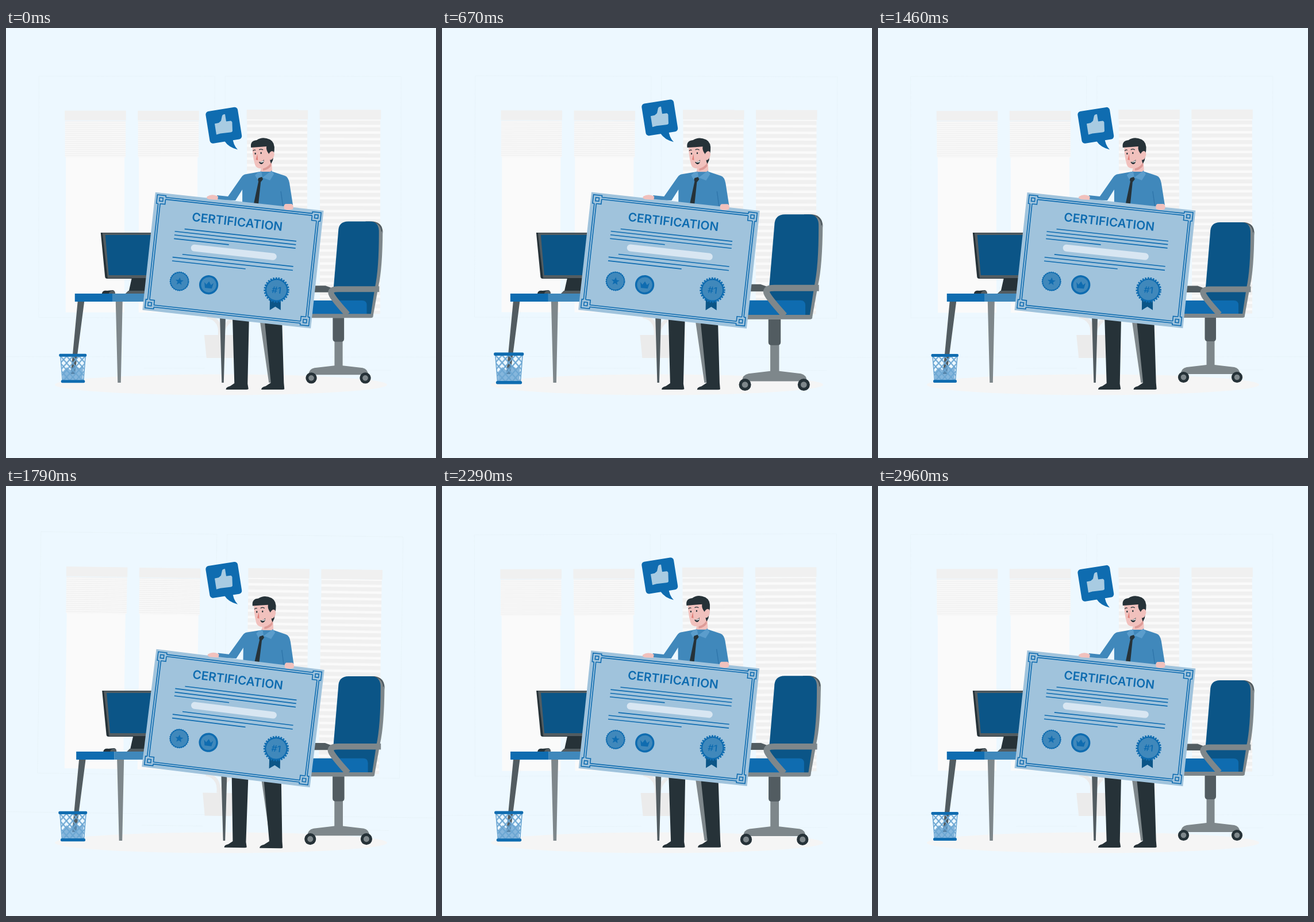
An HTML page for the animation above (3000 ms loop, 748x748 px).

```html
<!DOCTYPE html>
<html lang="en">
<head>
<meta charset="utf-8">
<title>Certification</title>
<style>
  html, body { margin: 0; width: 100%; height: 100%; overflow: hidden; background: #edf8ff; }
  svg { display: block; width: 100vw; height: 100vh; }
  text { font-family: Inter, "Open Sans", sans-serif; fill: #0f6cb0; text-anchor: middle; }
  .faint { fill: none; stroke: #e5f0f6; stroke-width: .6; }
  .ink { fill: none; stroke: #0f6cb0; stroke-width: 1.6; }
  .blue { fill: #0f6cb0; }
  .navy { fill: #0b5587; }
  .mid { fill: #4088bb; }
  .dark { fill: #263238; }
  .steel { fill: #525c61; }
  .grey { fill: #7e878b; }
  .skin { fill: #f1c1bd; }
</style>
</head>
<body>
<svg viewBox="0 0 748 748">
  <defs>
    <pattern id="thin" width="10" height="3.5" y="162" patternUnits="userSpaceOnUse">
      <rect width="10" height="3.5" fill="#f8f8f8"/><rect width="10" height="1" fill="#eee"/>
    </pattern>
    <pattern id="wide" width="10" height="11.4" y="161" patternUnits="userSpaceOnUse">
      <rect width="10" height="11.4" fill="#fafafa"/><rect width="10" height="7" fill="#f0f0f0"/>
    </pattern>
    <pattern id="mesh" width="10.6" height="12" x="95" y="571" patternUnits="userSpaceOnUse">
      <path d="M0 0L10.6 12M10.6 0L0 12" stroke="#6ba6d2" stroke-width="2"/>
    </pattern>
    <g id="closed">
      <rect x="104" y="224" width="102" height="271" fill="#fafafa"/>
      <rect x="102.500" y="162" width="105.500" height="63" fill="url(#thin)"/>
      <rect x="102" y="144" width="106.500" height="17" fill="#f0f0f0"/>
    </g>
    <g id="open">
      <rect x="419" y="159" width="105" height="338" fill="url(#wide)"/>
      <rect x="418.500" y="142" width="106.500" height="17" fill="#f0f0f0"/>
    </g>
    <g id="corner" class="ink">
      <path d="M19 7V4H4V19H7M10.500 19H19V10.500"/>
      <rect x="8.500" y="8.500" width="6" height="6"/>
    </g>
    <g id="wheel"><circle r="9.600" class="dark"/><circle r="4.800" class="grey"/></g>
  </defs>

  <g id="room">
    <path class="faint" d="M57 84H363V504H57ZM381 84H687V504H381ZM0 572H748M240 592H346M560 595H670"/>
    <use href="#closed"/><use href="#closed" x="127"/>
    <use href="#open"/><use href="#open" x="127"/>
    <path d="M350 502Q375 506 372 534M395 505Q377 518 377 534" fill="none" stroke="#ebebeb" stroke-width="6"/>
    <path d="M345 534H401L396 574H349Z" fill="#ebebeb"/>
  </g>

  <ellipse cx="374" cy="620.500" rx="289" ry="18" fill="#f5f5f5"/>

  <g id="desk">
    <path class="steel" d="M125 475H136.500L120 602H113ZM371.500 475H383L379 617H375.500Z"/>
    <path class="grey" d="M191 475H203L200 617H194.500ZM437 475H450L463 617H457.500Z"/>
    <rect class="blue" x="120" y="462" width="66" height="14"/>
    <rect class="mid" x="186" y="462" width="255" height="14"/>
    <path class="dark" d="M165 356H262V436H176Q173 436 172.500 433ZM219 435H250L247 462H213Z"/>
    <path class="steel" d="M168 356.500H262V435H177Z"/>
    <path class="navy" d="M173 360H262V430H179Z"/>
    <path class="dark" d="M167 462Q168 456 176 457L186 456Q190 457 190 462Z"/>
    <path class="steel" d="M179 462Q180 457 187 456.500Q190 458 190 462ZM208 462L213 457H250V462Z"/>
  </g>

  <g id="bin">
    <path d="M99 598L106 590L112 595L119 586L128 592L134 588L133 613H99Z" fill="#5a9bce" opacity=".7"/>
    <path d="M95 571H138L134.500 614H98.500Z" fill="url(#mesh)" stroke="#6ba6d2" stroke-width="1.500"/>
    <rect class="blue" x="92.500" y="567" width="47.500" height="5" rx="2"/>
    <rect class="blue" x="96" y="612" width="41" height="5" rx="2"/>
  </g>

  <g id="chair">
    <path class="steel" d="M520 448.500H556L568 453L564 460H520Z"/>
    <path class="steel" d="M625 338H638Q654 340 654.500 356L650 400H638Z"/>
    <path class="grey" d="M630 340H638Q651 342 652 356L654.500 354Q654 420 647 450L638 500H628Z"/>
    <path class="navy" d="M578 356Q578 338 595 338H632Q649 338 648 358Q648 420 641 452L634 498H566Z"/>
    <path class="blue" d="M518 474H619Q627 474 627 482V498H518Z"/>
    <path d="M648.500 454.500H578Q561 454.500 567 465Q573 475 594 498" fill="none" stroke="#7e878b" stroke-width="10"/>
    <path class="grey" d="M515 497H638V501Q638 504 634 504H515Z"/>
    <path class="grey" d="M571.500 540H585.500V586L620 590Q629 592 629.500 602H527Q527 592 537 590L571.500 586Z"/>
    <path class="steel" d="M568.500 504H588V540Q588 545 583 545H573.500Q568.500 545 568.500 540Z"/>
    <use href="#wheel" x="531.500" y="607.500"/><use href="#wheel" x="624.500" y="607.500"/>
  </g>

  <g id="man">
    <path class="dark" d="M394 500H423L420.500 619L422 628Q421 629 418 629H383Q382 625 390 623L397.500 618ZM449 500H480L483.500 617L484.500 628Q484 629 481 629H444.500Q444 625 452 623L461 617Z"/>
    <path class="skin" d="M446 236L462 232L463 252L447 256L442 250Z"/>
    <path d="M447 244Q456 242 461 234V240Q456 247 447 248Z" fill="#dd9b97"/>
    <path class="mid" d="M419 254L441 250L464 250L485 257Q491 259 493 270L499 308L484 314L411 306V281L399 300L367 299V291L386 293L409 260Q413 254 419 254Z"/>
    <path d="M478 284L482 312" stroke="#2f76ab" stroke-width="1.500"/>
    <path d="M437 252L444 249L446 260L438 265L433 256ZM446 260L462 248L466 254L459 265Z" fill="#5b9dcc"/>
    <path class="dark" d="M439 261L445 259L447 263L443 268L439 306L431 305L439 267L438 264Z"/>
    <path class="skin" d="M428 205L457 202L461 213V230Q459 241 448 244Q436 246 433 238Q430 228 429 217Z"/>
    <path class="dark" d="M426 208Q424 196 436 195Q446 188 459 194Q468 199 466.500 213L464 230L461 236Q458 230 459 222L455 216Q452 211 453 206Q440 207 426 208Z"/>
    <path class="skin" d="M457 219Q461 212 465 215Q468 219 465 225Q462 231 458 229Z"/>
    <ellipse cx="433.500" cy="218.500" rx="1.200" ry="1.700" class="dark"/>
    <ellipse cx="443.500" cy="217.500" rx="1.200" ry="1.700" class="dark"/>
    <path d="M429.500 214Q431 211 434 212.500M440 212Q443 209.500 447 212" fill="none" stroke="#263238" stroke-width="1.200"/>
    <path d="M437 219L434.500 229L438 230Z" fill="#e07f79"/>
    <path class="dark" d="M439.500 233Q445 233 448.500 229Q449 236 444 237Q441 236.500 439.500 233Z"/>
    <path d="M441 233Q445 233 448 230.500V232.500Q445 235 441 233Z" fill="#fff"/>

    <g transform="translate(259.700 285.800) rotate(6.200)">
      <rect width="294.500" height="206" fill="#a0c3dc"/>
      <path class="ink" d="M19 7H275.500M19 10.500H275.500M19 199H275.500M19 195.500H275.500M7 19V187M10.500 19V187M287.500 19V187M284 19V187"/>
      <use href="#corner"/>
      <use href="#corner" transform="translate(294.500) scale(-1 1)"/>
      <use href="#corner" transform="translate(0 206) scale(1 -1)"/>
      <use href="#corner" transform="translate(294.500 206) scale(-1)"/>
      <text x="147.300" y="43" font-size="20.800" font-weight="600">CERTIFICATION</text>
      <path class="ink" d="M57.500 58H253M41 64H253M41 70.300H253M41 76.700H137M58.500 102.300H252.500M42 109H252.500M42 115.500H170.500"/>
      <path d="M78 89H216" stroke="#d8e6f2" stroke-width="12" stroke-linecap="round"/>

      <g transform="translate(58.500 149.500)">
        <circle r="15.500" class="mid" stroke="#0f6cb0" stroke-width="1.500"/>
        <circle r="16" fill="none" stroke="#0f6cb0" stroke-width="2" stroke-dasharray="2 1.590"/>
        <path class="blue" d="M0 -7L2 -2.300L7 -2.100L3 1.100L4.400 6L0 3.200L-4.400 6L-3 1.100L-7 -2.100L-2 -2.300Z"/>
      </g>
      <g transform="translate(109.800 150)">
        <circle r="16.700" class="blue"/>
        <circle r="13.200" class="mid"/>
        <path class="blue" d="M-8 -4L-4 0L0 -6L4 0L8 -4L6 6H-6Z"/>
      </g>
      <g transform="translate(228.100 146.200)">
        <path class="navy" d="M-10 15L-8 36L1 29L11 34L9 15Z"/>
        <circle r="20" class="blue"/>
        <circle r="20.500" fill="none" stroke="#0f6cb0" stroke-width="3.400" stroke-dasharray="2.600 2"/>
        <circle r="17.600" class="mid"/>
        <text y="5.500" font-size="15.500" font-weight="600">#1</text>
      </g>
    </g>
    <path class="skin" d="M368 299L353 298Q347 296 350 293Q356 289 364 291L369 293ZM484 315Q482 308 486 306L497 306Q501 309 499 315Q492 318 484 315Z"/>
  </g>

  <g id="bubble">
    <path class="blue" d="M378 194L394 190Q395 204 403 212Q387 208 380 197Z"/>
    <g transform="translate(378.800 169.700) rotate(-9)">
      <rect class="blue" x="-28.200" y="-28.200" width="56.400" height="56.400" rx="5.500"/>
    </g>
    <path d="M363 167L370 165.500L374 162L376 153Q377 150 381 150.500L383 163L391 162Q394 163 393.500 167L394 180Q393 182 390 182L373 184L366 186Z" fill="#a8cbe2"/>
  </g>
</svg>
<script>
  const FPS = 24, PERIOD = 1500, LEAD = 22;
  const el = id => document.getElementById(id);
  const [room, desk, bin, chair, man, bubble] =
    ['room', 'desk', 'bin', 'chair', 'man', 'bubble'].map(el);

  // Linear interpolation through [phase, value] stops.
  function track(stops, p) {
    const i = stops.findIndex(s => s[0] > p);
    const [a, from] = stops[i - 1], [b, to] = stops[i];
    return from + (to - from) * (p - a) / (b - a);
  }

  const sway = [[0, 0], [.25, 1], [.75, -1], [1, 0]];
  const lift = [[0, 0], [.5, -15], [1, 0]];
  const shake = [0, -1, 2, -4, 4, -4, 4, -4, 2, -1, 0].map((x, i) => [i / 10, x * 1.5]);
  const beat = [[0, 1], [.14, 1.1], [.28, 1], [.46, 1.1], [.65, 1], [1, 1]];

  const move = (node, value) => node.setAttribute('transform', value);
  const scale = (node, k, x, y) =>
    move(node, `translate(${x} ${y}) scale(${k}) translate(${-x} ${-y})`);

  function draw(now) {
    const time = Math.floor((now + 3) * FPS / 1000) * 1000 / FPS + LEAD;
    const p = time % PERIOD / PERIOD;
    const angle = track(sway, p), k = track(beat, p);
    move(room, `rotate(${angle} 374 345)`);
    move(man, `rotate(${angle} 396 408)`);
    move(desk, `translate(${track(shake, p)})`);
    move(bubble, `translate(0 ${track(lift, p)})`);
    scale(chair, k, 576, 477);
    scale(bin, k, 116.5, 592);
    requestAnimationFrame(draw);
  }
  draw(0);
</script>
</body>
</html>
```
